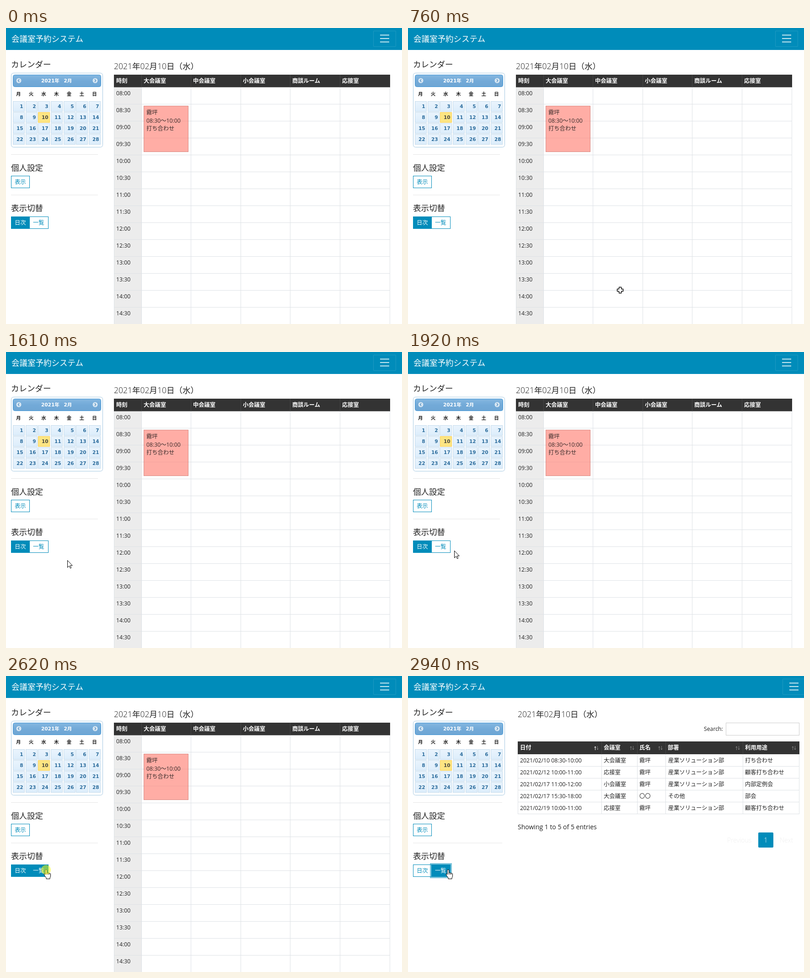
Animation of 866 by 647 pixels, one loop 4640 ms. Source, as an HTML page:

```html
<!DOCTYPE html>
<html lang="ja">
<head>
<meta charset="utf-8">
<style>
html, body { margin: 0; width: 100%; height: 100%; overflow: hidden; background: #fff; }
svg { display: block; width: 866px; height: 647px; }
text { font-family: "Open Sans", "Noto Sans CJK JP", "Noto Sans CJK", sans-serif; white-space: pre; }
.cal text { font-family: "DejaVu Sans", "Noto Sans CJK JP", "Noto Sans CJK", sans-serif; font-weight: 700; }
</style>
</head>
<body>
<svg id="stage" viewBox="0 0 866 647"></svg>
<script>
const LOOP = 4640, BLUE = '#008cba', INK = '#222', GRID = '#dee2e6', BODY = 12.25, HEAD = 17.5;

const rect = (x, y, w, h, fill, more = '') =>
  `<rect x="${x}" y="${y}" width="${w}" height="${h}" fill="${fill}" ${more}/>`;
const box = (x, y, w, h, fill, stroke, more = '') =>
  rect(x + .5, y + .5, w - 1, h - 1, fill, `stroke="${stroke}" ${more}`);
const text = (x, y, s, size = BODY, fill = INK, more = '') =>
  `<text x="${x}" y="${y}" font-size="${size}" fill="${fill}" ${more}>${s}</text>`;
const group = (id, s) => `<g id="${id}">${s}</g>`;
const bold = 'font-weight="700"', light = 'font-weight="300"', mid = 'text-anchor="middle"';

function calendar() {
  let s = box(11, 98, 201, 163, '#fff', '#a6c9e2', 'rx="5"')
    + box(15, 102, 193, 27, 'url(#bar)', '#4297d7', 'rx="4"')
    + text(77, 118.5, '2021年', 10.5, '#fff') + text(126.5, 118.5, '2月', 10.5, '#fff');
  for (const [x, d] of [[28, -1], [195, 1]])
    s += `<circle cx="${x}" cy="115" r="5.5" fill="#d8e7f3"/>
      <path d="M${x - d} 112l${2.5 * d} 3l${-2.5 * d} 3" fill="none" stroke="#5c94c4" stroke-width="1.5"/>`;
  [...'月火水木金土日'].forEach((c, i) => s += text(27.2 + 27.7 * i, 148, c, 10.5, INK, mid));
  for (let d = 1; d <= 28; d++) {
    const x = Math.round(15 + 27.65 * ((d - 1) % 7)), y = 160 + 24 * Math.floor((d - 1) / 7);
    const today = d === 10;
    s += box(x, y, 26, 23, today ? '#fde582' : 'url(#day)', today ? '#f5cd55' : '#c5dbec')
      + text(x + 22.5, y + 15, d, 10.5, today ? '#4a4a42' : '#2e6e9e', 'text-anchor="end"');
  }
  return `<g class="cal">${s}</g>`;
}

// parts whose place depends on the page width
function frame(menuX, ruleW) {
  let s = box(menuX, 6, 50, 35, 'none', '#fff', 'stroke-opacity=".12" rx="1"');
  for (const y of [14.5, 22, 29.5]) s += rect(menuX + 15, y, 20, 2, '#fff', 'opacity=".8"');
  return s + rect(11, 276, ruleW, 1, '#e5e5e5') + rect(11, 364.5, ruleW, 1, '#e5e5e5');
}

const dateTitle = x => text(x, 90, '2021年02月10日（水）', HEAD, INK, light);

function dayView() {
  const cols = [236, 296, 404, 513, 621, 730, 839];
  let s = frame(803, 190) + dateTitle(236) + rect(236, 129, 60, 518, '#ececec');
  for (let i = 0; i < 14; i++) {
    const y = 129 + 37 * i, m = i % 2 ? '30' : '00';
    s += rect(236, y + 37, 604, 1, GRID)
      + text(241, y + 17.5, String(8 + (i >> 1)).padStart(2, '0') + ':' + m);
  }
  for (const x of cols) s += rect(x, 129, 1, 518, GRID);
  s += rect(236, 102, 604, 27.5, '#333');
  ['時刻', '大会議室', '中会議室', '小会議室', '商談ルーム', '応接室'].forEach((h, i) => {
    if (i) s += rect(cols[i], 102, 1, 27, '#444');
    s += text(cols[i] + 5, 119.5, h, BODY, '#fff', bold);
  });
  s += box(301, 170, 98, 101, '#ff8b80', '#c8594f', 'opacity=".7"');
  ['霧坪', '08:30～10:00', '打ち合わせ'].forEach((v, i) => s += text(307, 189 + 17.5 * i, v, BODY, '#3a2c2b'));
  return s;
}

function listView() {
  const cols = [240, 423, 501, 563, 732, 855];
  const team = '産業ソリューション部', who = '霧坪';
  const rows = [
    ['2021/02/10 08:30-10:00', '大会議室', who, team, '打ち合わせ'],
    ['2021/02/12 10:00-11:00', '応接室', who, team, '顧客打ち合わせ'],
    ['2021/02/17 11:00-12:00', '小会議室', who, team, '内部定例会'],
    ['2021/02/17 15:30-18:00', '大会議室', '〇〇', 'その他', '部会'],
    ['2021/02/19 10:00-11:00', '応接室', who, team, '顧客打ち合わせ']
  ];
  let s = frame(819, 195) + dateTitle(240) + text(647, 120, 'Search:')
    + box(695, 102, 161, 28, '#fff', '#ccc') + rect(240, 143, 616, 28, '#333');
  ['日付', '会議室', '氏名', '部署', '利用用途'].forEach((h, i) => {
    const x = cols[i], end = cols[i + 1];
    if (i) s += rect(x, 143, 1, 28, '#444');
    s += text(x + 5, 161, h, BODY, '#fff', bold);
    const arrow = (d, o) => `<path d="${d}" fill="none" stroke="#fff" opacity="${o}"/>`;
    s += arrow(`M${end - 13.5} 162v-8m-2 2.5l2-2.5l2 2.5`, i ? .35 : 1)
      + arrow(`M${end - 8.5} 153v8m-2-2.5l2 2.5l2-2.5`, .35);
  });
  for (const x of cols) s += rect(x, 171, 1, 131, GRID);
  rows.forEach((r, j) => {
    const y = 171 + 26 * j;
    r.forEach((v, i) => s += text(cols[i] + 5 + (i === 3), y + 18, v));
    s += rect(240, y + 26, 616, 1, GRID);
  });
  return s + text(240, 335, 'Showing 1 to 5 of 5 entries', 14)
    + text(698, 364, 'Previous', 14, '#eee', light) + text(813, 364, 'Next', 14, '#eee', light)
    + rect(766, 342, 33, 33, BLUE, 'rx="2"') + text(782.5, 364, '1', 14, '#fff', light + mid.padStart(mid.length + 1));
}

const toggle = (id, x, w, label, tx) => box(x, 412, w, 27, '#fff', BLUE)
  + rect(x, 412, w, 27, BLUE, `id="${id}Fill"`) + text(tx, 429.5, label, BODY, '#fff', `id="${id}Text"`);

const outline = 'fill="#fff" stroke="#000" stroke-linejoin="round"';
const stage = document.getElementById('stage');
stage.innerHTML = `<defs>
  <linearGradient id="bar" x2="0" y2="1"><stop stop-color="#84b7e0"/><stop offset=".5" stop-color="#73aad8"/><stop offset="1" stop-color="#6ea6d4"/></linearGradient>
  <linearGradient id="day" x2="0" y2="1"><stop stop-color="#eaf4fd"/><stop offset="1" stop-color="#dcedfb"/></linearGradient></defs>`
  + rect(0, 0, 866, 48, BLUE) + text(12, 29.5, '会議室予約システム', HEAD, '#fff')
  + text(11, 86, 'カレンダー', HEAD) + calendar()
  + text(11, 312, '個人設定', HEAD) + box(11, 323, 41, 27, '#fff', BLUE) + text(19, 341, '表示', BODY, BLUE)
  + text(11, 400, '表示切替', HEAD)
  + toggle('day', 11, 41, '日次', 19)
  + rect(49.5, 410.5, 45, 30, 'none', `id="glow" stroke="${BLUE}" stroke-opacity=".5" stroke-width="3"`)
  + toggle('list', 51, 42, '一覧', 59)
  + group('dayView', dayView()) + group('listView', listView())
  + group('cross', `<path d="M-2.5-6.5h5v4h4v5h-4v4h-5v-4h-4v-5h4z" ${outline} stroke-width="1.4"/>`)
  + group('arrow', `<path d="M.5.5V16l3.6-3.4 2.5 5.2 2.2-1-2.4-5h4.8z" ${outline}/>`)
  + group('hand', `<path d="M-2 11V2a1.7 1.7 0 0 1 3.4 0v5q1.6-1 3 .6 1.6-.8 2.6.8 2-.6 2.5 1.2v4.4q0 2-1.5 4v2.5h-8v-2.5q-2.5-3-4-5.6-1.4-3 .3-2.9z" ${outline}/>
      <path d="M1.4 7v4M4.4 8v3M7 9v2" stroke="#000"/>`)
  + '<circle id="click" cx="87.5" cy="423.5" r="10.5" fill="#ff0" opacity=".5" style="mix-blend-mode:normal"/>';

const $ = id => document.getElementById(id);
const show = (id, on) => $(id).style.display = on ? '' : 'none';
const clamp = v => Math.max(0, Math.min(1, v));

// start time, step length, steps, from, to, easing powers for x and y
const moves = [
  [280, 80, 7, [791, 641], [464, 573], 1, 1],
  [830, 80, 7, [464, 573], [202, 496], 1.4, 1.1],
  [1380, 460 / 6, 7, [202, 496], [107, 439], 1.5, 1.5],
  [1920, 78, 6, [107, 439], [88, 423], 2, 2]
];

function pointer(t) {
  const m = moves.filter(m => t >= m[0]).pop();
  if (!m) return null;
  const [start, gap, n, a, b, ...pow] = m;
  const u = Math.min(1, (Math.floor((t - start) / gap + .001) + 1) / n);
  return a.map((v, i) => Math.round(b[i] + (v - b[i]) * (1 - u) ** pow[i]));
}

function fillButton(id, f) {
  $(id + 'Fill').setAttribute('opacity', f);
  $(id + 'Text').setAttribute('fill', `rgb(${255 * f},${140 + 115 * f},${186 + 69 * f})`);
}

function draw(t) {
  const list = t >= 2710, p = pointer(t);
  show('dayView', !list);
  show('listView', list);
  show('click', t >= 2620 && !list);

  const kind = !p ? '' : t >= 2080 ? 'hand' : p[0] >= 236 ? 'cross' : 'arrow';
  for (const id of ['cross', 'arrow', 'hand']) show(id, id === kind);
  if (kind) $(kind).setAttribute('transform', `translate(${p})`);

  fillButton('list', t < 2080 ? 0 : t < 2160 ? .1 : t < 2240 ? .6 : 1);
  const swap = clamp(Math.floor((t - 2790) / 75 + 1) / 3);
  fillButton('day', 1 - swap);
  $('glow').setAttribute('opacity', swap);
}

function tick(now) {
  draw(now % LOOP);
  requestAnimationFrame(tick);
}
draw(0);
requestAnimationFrame(tick);
</script>
</body>
</html>
```
